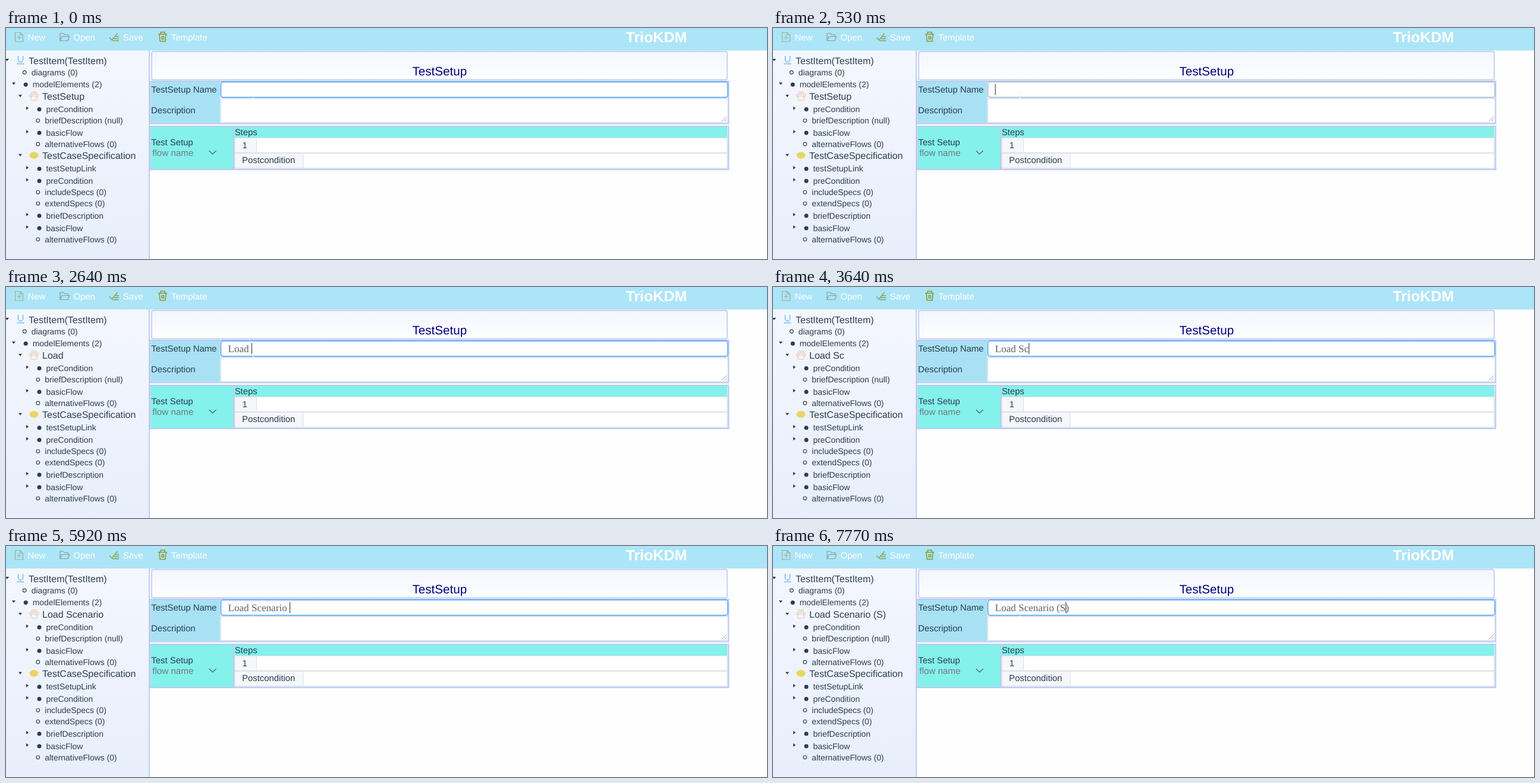
An HTML page for the animation above (7990 ms loop, 1280 by 390 pixels).

```html
<!DOCTYPE html>
<html lang="en">
<head>
<meta charset="utf-8">
<title>Test setup form</title>
<style>
  html, body { margin: 0; width: 100%; height: 100%; overflow: hidden; background: #fefefe; }
  svg { display: block; width: 100%; height: 100%; }
  text {
    font-family: "Liberation Sans", Arial, sans-serif;
    font-size: 14.9px; fill: #2c3e50; white-space: pre;
    text-rendering: geometricPrecision;
  }
  .tool { fill: #fff; }
  .node { font-size: 16px; }
  .leaf { font-size: 13.9px; }
  .typed { font-family: "Liberation Serif", "Times New Roman", serif; font-size: 17.1px; fill: #606266; }
</style>
</head>
<body>
<svg viewBox="0 0 1280 390" preserveAspectRatio="none">
  <defs>
    <linearGradient id="side" x1="0" y1="0" x2="0" y2="1">
      <stop offset="0" stop-color="#f4f7fe"/><stop offset="1" stop-color="#e8eefb"/>
    </linearGradient>
    <linearGradient id="head" x1="0" y1="0" x2="0" y2="1">
      <stop offset="0" stop-color="#f3f6fe"/><stop offset="1" stop-color="#fefeff"/>
    </linearGradient>
  </defs>

  <!-- toolbar -->
  <rect width="1280" height="38" fill="#ade5f8"/>
  <g fill="none" stroke-width="1.2">
    <path stroke="#9cb391" d="M15.5 7.5h8.5l4.5 4.5v11h-13zM24 7.5v4.5h4.5M22 12.5v7M18.5 16h7"/>
    <path stroke="#8d9c98" d="M91 21.5v-12.500h5.500l2 2.500h6v3M91 21.500l3-7h12.500l-2.500 7z"/>
    <path stroke="#84a257" stroke-width="1.4" d="M174 16l4 4.500l9.500-11.500M184 14.500h6M181.500 18h8.500M179 21.500h11"/>
    <path stroke="#8a9a32" stroke-width="1.5" d="M256 10.500h15M260 10v-3h7v3M258 11l1 11.500h9l1-11.500M262 14.500h3.500v4h-3.500z"/>
  </g>
  <text class="tool" x="36.500" y="20.600">New</text>
  <text class="tool" x="113.500" y="20.600">Open</text>
  <text class="tool" x="196.800" y="20.600">Save</text>
  <text class="tool" x="278" y="20.600">Template</text>
  <text class="tool" x="1042.500" y="24.200" style="font-size:25px;font-weight:bold">TrioKDM</text>

  <!-- sidebar -->
  <rect y="38" width="240" height="352" fill="url(#side)"/>
  <rect x="240" y="38" width="2" height="352" fill="#c0cef0"/>
  <g id="tree"></g>
  <path d="M20.500 47v6.500a4 4 0 0 0 8 0V47M18.500 60.500h12" fill="none" stroke="#70b9ef" stroke-width="1.4"/>
  <g fill="#f8f3f1" stroke="#e6cdb9" stroke-width="1.1">
    <path d="M47 114c-3 0-6 4-5.500 6.500s3.500 1.500 5.500 1.500s5 1 5.500-1.500s-2.500-6.500-5.500-6.500z"/>
    <ellipse cx="41" cy="114" rx="1.700" ry="2.300"/><ellipse cx="44.700" cy="109.700" rx="1.700" ry="2.400"/>
    <ellipse cx="49.500" cy="109.700" rx="1.700" ry="2.400"/><ellipse cx="53" cy="114" rx="1.700" ry="2.300"/>
  </g>
  <ellipse cx="47" cy="215" rx="7.500" ry="5.800" fill="#e8d65f"/>

  <!-- heading -->
  <rect x="245" y="39.500" width="968" height="48" rx="3" fill="url(#head)" stroke="#c0cff2" stroke-width="1.800"/>
  <text x="683.500" y="80" style="font-size:20.6px;fill:#000080">TestSetup</text>

  <!-- name and description -->
  <rect x="242.500" y="90" width="973" height="71.500" fill="#e4eaf9" stroke="#bccbf0" stroke-width="2"/>
  <rect x="244" y="91" width="116" height="69.500" fill="#a8e1f4"/>
  <path d="M244 118.500h116" stroke="#b4dff4"/>
  <text x="244.300" y="108.600">TestSetup Name</text>
  <text x="244" y="144.300">Description</text>
  <rect id="field" x="361.500" y="91" width="852.500" height="26" rx="4" fill="#fff" stroke-width="1.400"/>
  <rect x="361.500" y="119.500" width="852.500" height="40" rx="3" fill="#fff" stroke="#dcdfe8"/>
  <path d="M1204 157.500l8-8M1208.500 157.500l3.500-3.500" stroke="#8c8c8c" stroke-width=".9"/>
  <path id="beam" d="M413 107h2l1 1l1-1h2M416 108v9" fill="none" stroke="#efefef"/>
  <path d="M413 118.700l2.500-1.700l2.500 1.700z" fill="#fff"/>
  <text id="typed" class="typed" x="373.500" y="109.700"></text>
  <rect id="caret" y="94.500" width="1.200" height="18.800" fill="#444"/>

  <!-- flow -->
  <rect x="242.500" y="166" width="973" height="73" fill="#dfe6f6" stroke="#bccbf0" stroke-width="2"/>
  <rect x="244" y="167" width="138" height="71" fill="#84f1eb"/>
  <rect x="382" y="167" width="2.500" height="71" fill="#bccbf0"/>
  <rect x="384.500" y="167" width="828.500" height="18" fill="#84f1eb"/>
  <text x="244.300" y="197.700">Test Setup</text>
  <text x="246.200" y="216" style="font-size:15.2px;fill:#757b80">flow name</text>
  <path d="M341.500 207.300l6 5.700l6-5.700" fill="none" stroke="#45606c" stroke-width="1.200"/>
  <text x="384.700" y="181.300">Steps</text>
  <g stroke="#dce0e9">
    <rect x="385" y="185.500" width="828" height="25" rx="2" fill="#fff"/>
    <rect x="385" y="185.500" width="36.500" height="25" rx="2" fill="#f5f7fa"/>
    <rect x="385" y="211.500" width="828" height="25" rx="2" fill="#fff"/>
    <rect x="385" y="211.500" width="115" height="25" rx="2" fill="#f5f7fa"/>
  </g>
  <text x="397.500" y="202.500">1</text>
  <text x="397" y="228.300">Postcondition</text>
</svg>

<script>
const $ = id => document.getElementById(id);
const INK = '#2c3e50', LOOP = 7990;

// kind: d = open branch, r = closed branch, o = leaf, n = named node
const rows = [
  ['n', 38, 60.6, 'TestItem(TestItem)', 2],
  ['o', 42.700, 79.700, 'diagrams (0)'],
  ['d', 44.700, 100.300, 'modelElements (2)'],
  ['n', 61, 121.200, 'TestSetup', 24],
  ['r', 67.500, 142, 'preCondition'],
  ['o', 65.300, 161, 'briefDescription (null)'],
  ['r', 67.500, 181.700, 'basicFlow'],
  ['o', 65.300, 200.700, 'alternativeFlows (0)'],
  ['n', 61, 221.300, 'TestCaseSpecification', 24],
  ['r', 67.500, 242.400, 'testSetupLink'],
  ['r', 67.500, 263, 'preCondition'],
  ['o', 65.300, 282, 'includeSpecs (0)'],
  ['o', 65.300, 301, 'extendSpecs (0)'],
  ['r', 67.500, 321.800, 'briefDescription'],
  ['r', 67.500, 342.700, 'basicFlow'],
  ['o', 65.300, 361.500, 'alternativeFlows (0)']
];

function add(tag, attrs, label) {
  const el = document.createElementNS('http://www.w3.org/2000/svg', tag);
  for (const k in attrs) el.setAttribute(k, attrs[k]);
  if (label) el.textContent = label;
  return $('tree').appendChild(el);
}
const down = (x, y) => add('path', { d: `M${x - 3} ${y - 2}h6l-3 4z`, fill: INK });
const right = (x, y) => add('path', { d: `M${x - 2} ${y - 3}v6l4-3z`, fill: INK });

const labels = rows.map(([kind, x, y, label, arrow]) => {
  if (kind === 'n') down(arrow, y - 6.5);
  if (kind === 'd') down(13, y - 6.3);
  if (kind === 'r') right(36, y - 6.7);
  if (kind === 'o') add('circle', { cx: x - 11.5, cy: y - 4.7, r: 2.8, fill: '#fff', stroke: INK, 'stroke-width': 1.2 });
  if (kind === 'd' || kind === 'r') add('circle', { cx: x - 11.5, cy: y - 4.7, r: 3.5, fill: INK });
  return add('text', { x, y, class: kind === 'n' ? 'node' : 'leaf' }, label);
});
const nodeName = labels[3];

// time, text, caret index (-1 hides it)
const typing = [
  [0, '', -1], [530, '', 0], [1110, '', -1],
  [1650, 'L', 1], [1860, 'Lo', 2], [1980, 'Loa', 3], [2200, 'Load', 4],
  [2640, 'Load ', 5], [3070, 'Load S', 6], [3640, 'Load Sc', 7],
  [3970, 'Load Sce', 8], [4070, 'Load Scen', 9], [4530, 'Load Scena', 10],
  [5030, 'Load Scenar', 11], [5270, 'Load Scenari', 12], [5480, 'Load Scenario', 13],
  [5920, 'Load Scenario ', 14], [6360, 'Load Scenario (', 15],
  [6450, 'Load Scenario ()', 16], [6990, 'Load Scenario ()', 15],
  [7440, 'Load Scenario ()', -1], [7770, 'Load Scenario (S)', 16]
];
const borders = [
  [0, '#409eff'], [100, '#78b4f2'], [210, '#b3c3d8'], [320, '#c0c4cc'],
  [530, '#9fb9d6'], [650, '#409eff']
];

const pen = document.createElement('canvas').getContext('2d');
pen.font = '100px "Liberation Serif", "Times New Roman", serif';
const widthOf = s => pen.measureText(s).width * 0.171;
const stepAt = (steps, t) => steps.filter(s => s[0] <= t).pop();

function draw(t) {
  const [, value, caret] = stepAt(typing, t);
  $('typed').textContent = value;
  nodeName.textContent = value || 'TestSetup';
  $('caret').setAttribute('visibility', caret < 0 ? 'hidden' : 'visible');
  if (caret >= 0) $('caret').setAttribute('x', 373.4 + widthOf(value.slice(0, caret)));
  $('field').setAttribute('stroke', stepAt(borders, t)[1]);
  $('beam').setAttribute('visibility', t >= 320 && t < 3070 ? 'visible' : 'hidden');
}

const start = performance.now();
function tick() {
  draw((performance.now() - start) % LOOP);
  requestAnimationFrame(tick);
}
tick();
</script>
</body>
</html>
```
